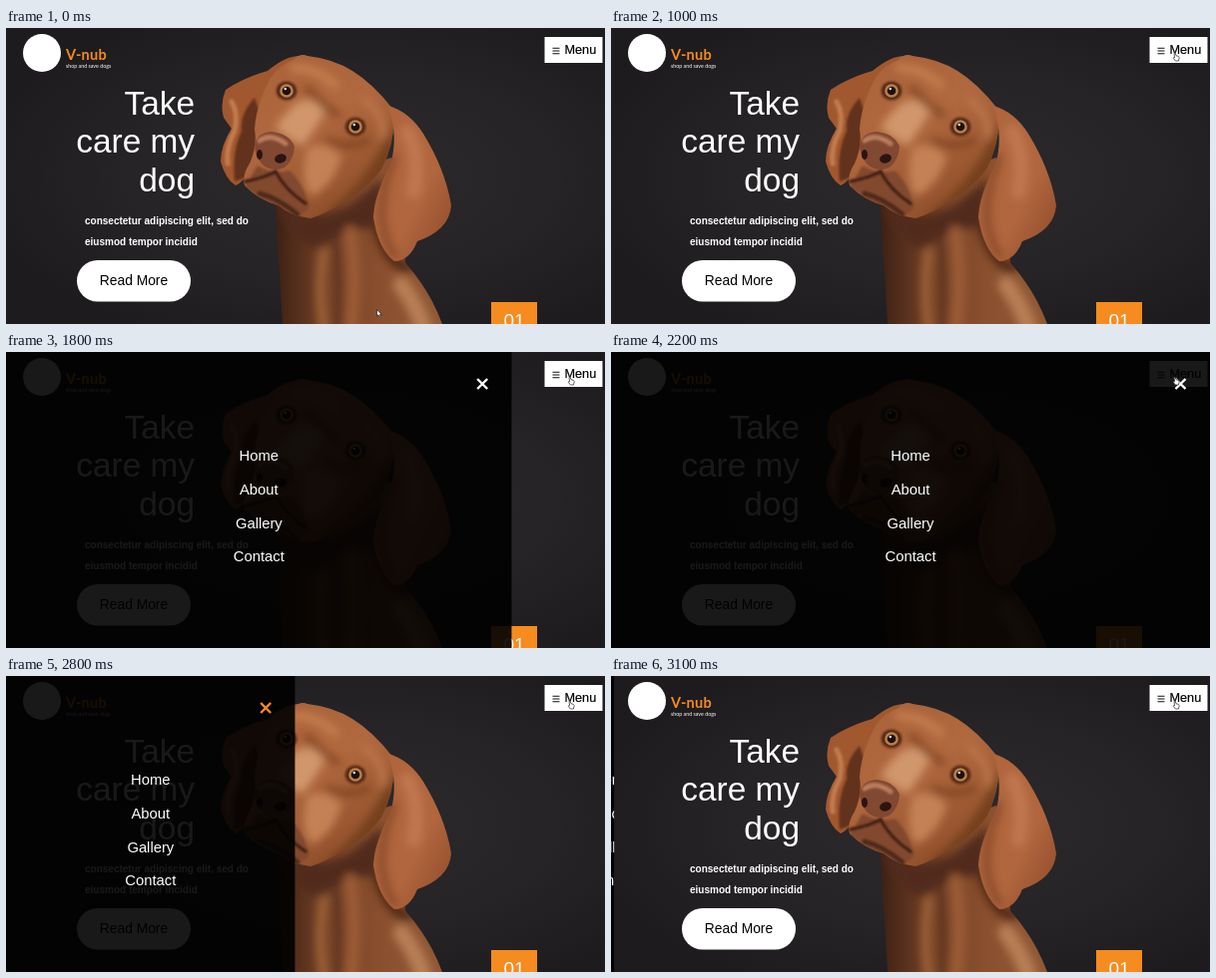
Write an HTML page that moves like this. It is 600 by 297 pixels and loops after 3200 ms.

```html
<!DOCTYPE html>
<html lang="en">
<head>
<meta charset="utf-8">
<title>Dog shop menu</title>
<style>
  html, body { margin: 0; width: 100%; height: 100%; overflow: hidden; background: #232124; }
  #stage { display: block; width: 600px; height: 297px; }
  text { font-family: "Liberation Sans", Arial, sans-serif; }
  .title { font-size: 33.4px; fill: #fff; text-anchor: end; }
  .lead { font-size: 10px; font-weight: bold; fill: #fff; }
  .logo { font-family: Lato, sans-serif; fill: #f68b1f; }
  .links { font-size: 14.8px; fill: #fff; text-anchor: middle; }
  .line { fill: none; stroke-linecap: round; }
</style>
</head>
<body>
<svg id="stage" viewBox="0 0 600 297">
  <defs>
    <radialGradient id="wall" cx=".56" cy=".5" r=".62">
      <stop offset="0" stop-color="#2d2a2c"/>
      <stop offset=".55" stop-color="#262426"/>
      <stop offset="1" stop-color="#1d1b1e"/>
    </radialGradient>
    <linearGradient id="fur" x1="0" y1="0" x2=".5" y2="1">
      <stop offset="0" stop-color="#a96139"/>
      <stop offset=".5" stop-color="#b0683e"/>
      <stop offset="1" stop-color="#92512d"/>
    </linearGradient>
    <linearGradient id="ear" x1="0" y1="0" x2="1" y2="1">
      <stop offset="0" stop-color="#b0653d"/>
      <stop offset=".6" stop-color="#b1663e"/>
      <stop offset="1" stop-color="#8c4928"/>
    </linearGradient>
    <linearGradient id="chest" x1="0" x2="1">
      <stop offset="0" stop-color="#3d2115"/>
      <stop offset=".3" stop-color="#744126"/>
      <stop offset=".65" stop-color="#8b502f"/>
      <stop offset="1" stop-color="#8f5936"/>
    </linearGradient>
    <filter id="soft" x="-50%" y="-50%" width="200%" height="200%"><feGaussianBlur stdDeviation="4"/></filter>
    <filter id="fine" x="-50%" y="-50%" width="200%" height="200%"><feGaussianBlur stdDeviation="1.3"/></filter>
    <clipPath id="headClip"><path id="head" d="M288 32Q294 25 302 28Q328 31 347 43Q368 56 388 82Q391 112 376 142Q360 164 338 174Q322 186 305 191Q286 189 273 178Q252 172 239 158Q236 148 244 136Q252 118 249 102Q250 78 265 50Q274 37 288 32Z"/></clipPath>
    <clipPath id="bodyClip"><path id="body" d="M270 170Q271 215 274 245L277 297H437Q424 262 400 236L386 130L300 160Z"/></clipPath>
    <clipPath id="earClip"><path id="rightEar" d="M383 78Q404 84 418 106Q440 142 446 178Q444 203 412 214Q404 234 389 234Q373 222 368 190Q369 168 384 140Q394 112 383 78Z"/></clipPath>
    <g id="eye">
      <ellipse rx="10.5" ry="9.5" fill="#572c19" filter="url(#fine)"/>
      <circle r="6.8" fill="#b8804d"/>
      <circle r="4.3" fill="#1c100d"/>
      <circle cx="-1.2" cy="-2" r="1.3" fill="#eee4d8"/>
    </g>
  </defs>

  <rect width="600" height="297" fill="url(#wall)"/>

  <!-- dog portrait -->
  <g>
    <use href="#body" fill="url(#chest)"/>
    <g clip-path="url(#bodyClip)" filter="url(#soft)">
      <path d="M268 172Q305 200 345 178L378 150L374 200Q340 200 312 222Q286 214 268 172Z" fill="#51291a"/>
      <path class="line" d="M372 200Q384 238 402 240" stroke="#542b18" stroke-width="12"/>
      <path class="line" d="M318 225Q312 262 318 300" stroke="#9f6239" stroke-width="9"/>
      <path class="line" d="M345 205Q352 250 346 300" stroke="#9b5b36" stroke-width="13"/>
      <path class="line" d="M330 215Q335 260 332 300" stroke="#5a301c" stroke-width="6"/>
      <path class="line" d="M396 258Q411 278 418 300" stroke="#b87e55" stroke-width="17"/>
    </g>
    <path d="M296 28Q281 27 262 43Q238 50 220 62Q214 76 218 90L226 101Q215 118 215 134Q220 152 230 158Q246 150 249 122L258 80Z" fill="#a2582f"/>
    <g filter="url(#fine)">
      <path d="M249 70Q234 86 236 103Q226 124 229 154L245 148L256 90Z" fill="#64331d"/>
      <path class="line" d="M226 74Q233 86 229 103Q220 120 222 136" stroke="#c17b4e" stroke-width="5"/>
    </g>
    <use href="#head" fill="url(#fur)"/>
    <g clip-path="url(#headClip)">
      <g filter="url(#soft)">
        <path d="M290 76Q306 66 320 82Q310 102 297 118Q280 110 270 99Q278 88 290 76Z" fill="#d1966c"/>
        <path d="M390 90Q374 130 350 158Q335 175 312 190L390 186Z" fill="#76401f"/>
        <path d="M302 120Q324 112 336 130Q328 158 306 169Q293 155 302 120Z" fill="#c48155"/>
        <path class="line" d="M302 61Q320 81 332 86" stroke="#844723" stroke-width="7"/>
        <path class="line" d="M323 114Q344 121 362 113" stroke="#824520" stroke-width="7"/>
        <path class="line" d="M288 40Q310 39 330 57" stroke="#c4804f" stroke-width="8"/>
        <path class="line" d="M360 72Q378 86 378 108" stroke="#bd774b" stroke-width="7"/>
      </g>
      <g filter="url(#fine)">
        <path d="M252 138Q268 148 284 143Q298 156 304 181L291 190Q264 178 239 160Z" fill="#82482d"/>
        <path class="line" d="M240 154Q262 149 270 144Q280 163 300 176" stroke="#411f15" stroke-width="3.5"/>
        <path class="line" d="M254 166Q273 171 292 187" stroke="#4d291c" stroke-width="5"/>
      </g>
    </g>
    <path d="M249 116Q252 105 266 104Q284 106 289 119Q288 133 279 140Q268 145 258 138Q249 130 249 116Z" fill="#814832"/>
    <path class="line" d="M254 113Q265 105 280 116" stroke="#bb7b5b" stroke-width="5" filter="url(#fine)"/>
    <ellipse cx="254" cy="127" rx="3" ry="5" fill="#2c1410"/>
    <ellipse cx="275" cy="131" rx="6" ry="4.5" transform="rotate(-18 275 131)" fill="#2c1410"/>
    <use href="#eye" x="281" y="63"/>
    <use href="#eye" x="350" y="99"/>
    <use href="#rightEar" fill="url(#ear)"/>
    <g clip-path="url(#earClip)" filter="url(#soft)">
      <path class="line" d="M388 130Q376 160 376 190Q380 216 389 228" stroke="#8b4c2b" stroke-width="8"/>
      <path class="line" d="M402 104Q416 130 408 165" stroke="#c17850" stroke-width="14"/>
    </g>
  </g>

  <!-- page -->
  <circle cx="36" cy="25" r="19" fill="#fff"/>
  <text class="logo" x="60" y="32" font-size="14.5" font-weight="bold" letter-spacing=".3">V-nub</text>
  <text class="logo" x="60" y="40" font-size="5.3" style="fill:#fff">shop and save dogs</text>
  <text class="title"><tspan x="189" y="86.6">Take</tspan><tspan x="189" y="125.2">care my</tspan><tspan x="189" y="163.6">dog</tspan></text>
  <text class="lead"><tspan x="79" y="197">consectetur adipiscing elit, sed do</tspan><tspan x="79" y="217.5">eiusmod tempor incidid</tspan></text>
  <rect x="71" y="233" width="114" height="41.5" rx="20.75" fill="#fff"/>
  <text x="128" y="258" font-size="13.8" text-anchor="middle">Read More</text>
  <rect x="486" y="275" width="46" height="22" fill="#f68b1f"/>
  <text x="509" y="300" font-size="19" text-anchor="middle" fill="#fff">01</text>
  <rect x="539.5" y="9" width="58" height="26" fill="#fff"/>
  <path d="M547.5 20.3h7M547.5 23h7M547.5 25.7h7" stroke="#111" stroke-width="1.1"/>
  <text x="559.5" y="26" font-size="12.7" stroke="#000" stroke-width=".2">Menu</text>

  <!-- sliding menu -->
  <svg id="menu" height="297" overflow="hidden">
    <rect width="100%" height="100%" opacity=".9"/>
    <g class="links">
      <text x="50%" y="109">Home</text>
      <text x="50%" y="143">About</text>
      <text x="50%" y="176.5">Gallery</text>
      <text x="50%" y="210">Contact</text>
    </g>
    <path id="cross" d="M-5 -5L5 5M5 -5L-5 5" stroke-width="2.4"/>
  </svg>

  <g id="cursor" fill="#fff" stroke="#222" stroke-width=".7" stroke-linejoin="round">
    <path id="arrow" d="M-1.5 -3.5V3L0 1.8L1.2 4L2.3 3.5L1.3 1.4H3.2Z"/>
    <path id="hand" d="M-2 -3.5Q-1.3 -4.2 -.7 -3.2L0 -1.3L2.4 -.6Q3.4 0 3 1.8L2.4 4H-.6L-2.8 1.2Q-2.6 .2 -1.4 .8Z"/>
  </g>
</svg>
<script>
  const LOOP = 3200, WIDTH = 600, SLIDE = 500;
  const $ = id => document.getElementById(id);
  const clamp = x => Math.min(1, Math.max(0, x));
  const mix = (a, b, p) => a + (b - a) * p;
  const smooth = p => p * p * (3 - 2 * p);

  // CSS "ease": cubic-bezier(.25, .1, .25, 1)
  function ease(x) {
    if (x <= 0 || x >= 1) return clamp(x);
    const curve = (a, b, u) => 3 * a * u * (1 - u) ** 2 + 3 * b * u * u * (1 - u) + u ** 3;
    let lo = 0, hi = 1;
    for (let i = 0; i < 24; i++) {
      const mid = (lo + hi) / 2;
      if (curve(.25, .25, mid) < x) lo = mid; else hi = mid;
    }
    return curve(.1, 1, lo);
  }

  function draw(t) {
    const width = WIDTH * (ease((t - 1528) / SLIDE) - ease((t - 2650) / SLIDE));
    $("menu").setAttribute("width", width);
    $("menu").style.display = width > 0 ? "" : "none";
    $("cross").setAttribute("transform", `translate(${width - 29.5} 32)`);
    const hover = clamp((t - 2450) / 200);
    $("cross").setAttribute("stroke", `rgb(${mix(255, 246, hover)},${mix(255, 139, hover)},${mix(255, 31, hover)})`);

    const go = smooth(clamp((t - 20) / 580)), settle = smooth(clamp((t - 650) / 300));
    const x = mix(373, 572, go) - 6 * settle, y = mix(286, 31, go) - 2 * settle;
    $("cursor").setAttribute("transform", `translate(${x} ${y})`);
    const onButton = x > 540 && y < 36;
    $("hand").style.display = onButton ? "" : "none";
    $("arrow").style.display = onButton ? "none" : "";
  }

  const start = performance.now();
  function frame() {
    draw((performance.now() - start) % LOOP);
    requestAnimationFrame(frame);
  }
  frame();
</script>
</body>
</html>
```
